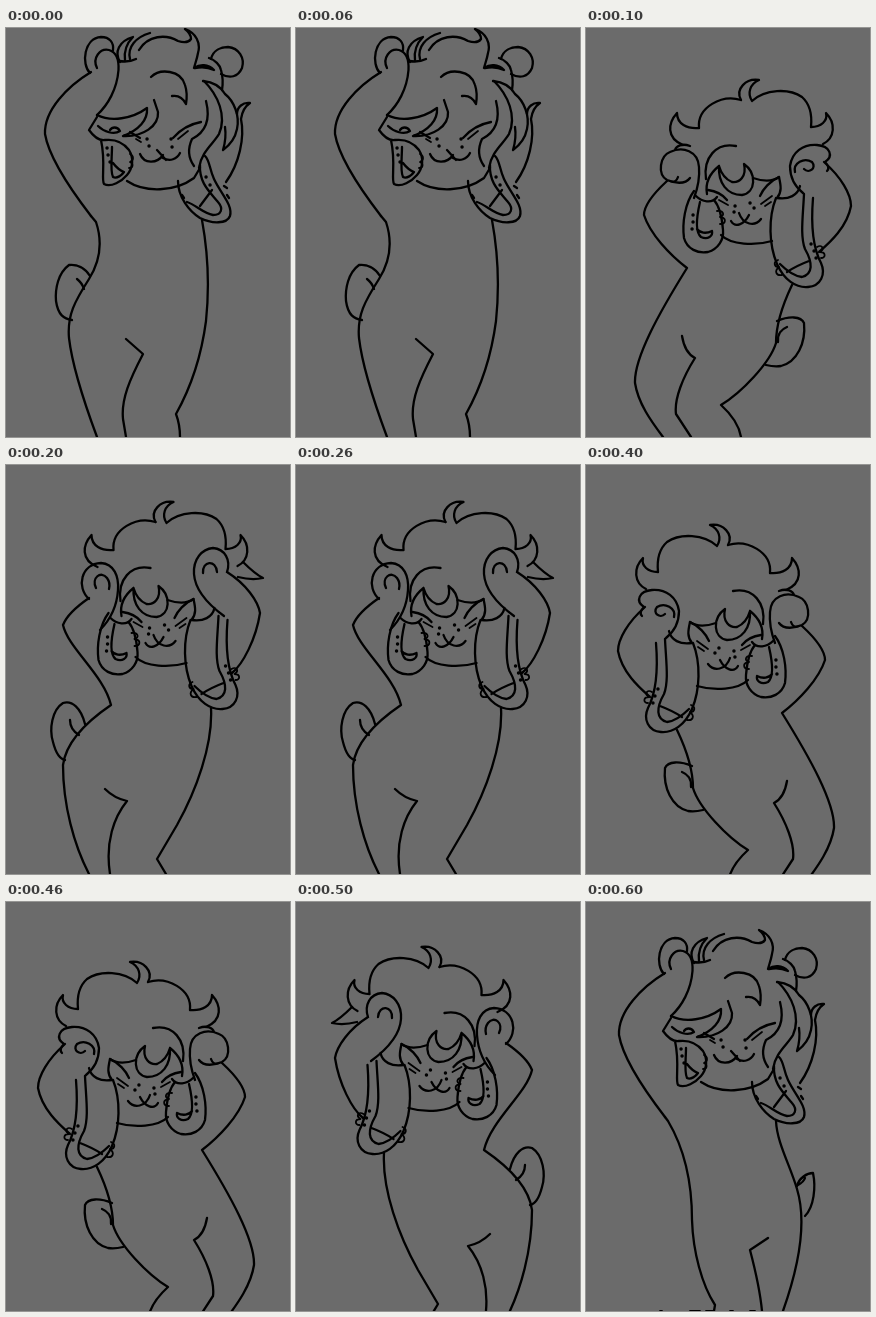
An HTML page without scripts that plays this animation: 284x409 px, repeating every 700 ms.

```html
<!DOCTYPE html>
<html lang="en">
<head>
<meta charset="utf-8">
<title>Dance loop</title>
<style>
html, body { margin: 0; width: 100%; height: 100%; overflow: hidden; background: #6b6b6b; }
svg { display: block; width: 100%; height: 100%; }
.ink { fill: none; stroke: #000; stroke-width: 2.3; stroke-linecap: round; stroke-linejoin: round; }
.fine { stroke-width: 1.8; }
.dots { stroke-width: 3.4; }
.pose { visibility: hidden; animation: show 700ms step-end infinite; animation-delay: calc(var(--i) * 100ms - 700ms); }
@keyframes show {
  0% { visibility: visible; }
  14.2857%, 100% { visibility: hidden; }
}
</style>
</head>
<body>
<svg viewBox="0 0 284 409" preserveAspectRatio="none">
<defs>
  <!-- head tilted back, arms up -->
  <g id="headUp">
    <!-- left paw and arm -->
    <path d="M84 45C75 36 78 10 95 9C104 9 108 15 107 22"/>
    <path d="M91 40C86 30 94 20 103 22C110 24 113 32 112.500 42C111 61 102 77 91 87"/>
    <path d="M85 44C62 58 38 82 39 106C43 130 65 162 85 188"/>
    <!-- crown -->
    <path d="M114 34C108 24 113 13 127 9C120 16 118 24 119 32"/>
    <path d="M124 31C121 19 130 9 144 5"/>
    <path d="M113 33C119 34 126 33 130 31"/>
    <path d="M133 22C142 7 160 6 172 13C178 15 183 14 185 11C185 7 183 4 179 1C190 5 195 15 192 25C191 31 189 36 188 40C194 36 202 36 208 42C202 39 194 39 189 40"/>
    <!-- right paw -->
    <path d="M205 31C207 22 215 19 222 19C233 20 239 30 236 40C232 49 224 51 215 46"/>
    <path d="M203 30C209 32 214 37 215 42C217 49 217 56 216 62"/>
    <!-- side hair -->
    <path d="M197 53C207 54 215 59 219 66C228 73 234 88 231 101C229 111 224 117 217 122C220 112 220 106 219 99"/>
    <path d="M198 53C212 67 221 88 213 106C208 115 195 124 193 140"/>
    <path d="M200 73C205 93 198 105 186 111C181 122 183 131 188 138"/>
    <path d="M231 86C231 79 237 74 244 75C238 79 236 84 235 91C239 110 233 136 220 154"/>
    <!-- fringe -->
    <path d="M145 49C154 40 175 42 179 57C181 63 181 70 180 76C177 70 172 67 166 68"/>
    <path d="M91 87C105 94 126 91 141 80C142 92 133 102 117 108C137 109 153 98 152 84L148 72"/>
    <!-- face -->
    <path d="M167 110C174 102 184 96 195 94M124 104L134 110"/>
    <path class="fine" d="M172 111L182 103M130 111L135 114"/>
    <path d="M134 126C138 136 151 136 157 127M151 122L160 132M157 130C164 134 171 131 174 125"/>
    <path class="dots fine" d="M141 111h.1M143 118h.1M165 111h.1M166 119h.1"/>
    <path d="M121 153C139 165 169 164 188 150L194 140"/>
    <!-- left ear -->
    <path d="M91 89L83 102C88 109 93 113 99 112C108 111 117 114 123 122C128 130 127 140 121 147C116 153 105 160 98 156C95 151 100 135 95 112"/>
    <path d="M92 98C98 104 108 107 114 103C111 98 106 99 104 102"/>
    <path d="M106 119C106 130 104 143 107 149C111 151 116 147 118 144C113 142 110 139 107 135"/>
    <path class="fine" d="M124 126C128 128 128 132 124 134C128 136 127 140 123 140"/>
    <path class="dots" d="M101 120h.1M102 127h.1M104 134h.1"/>
    <!-- right ear -->
    <path d="M172 153C172 169 183 183 194 190C206 196 221 196 224 188C227 177 215 166 208 151C203 140 204 133 199 128"/>
    <path d="M194 137C193 155 204 164 212 174C218 181 215 187 207 187C197 185 190 177 181 174M206 162L194 178"/>
    <path d="M218 158l3 2M221 167l2 3M176 167l2 3"/>
    <path class="dots" d="M200 149h.1M204 157h.1"/>
  </g>

  <!-- head bowed, ears hanging -->
  <g id="headDown">
    <path d="M155 72C136 66 111 79 113 100C101 101 91 96 91 85C82 95 80 110 97 117"/>
    <path d="M155 72C149 61 160 50 173 52C164 56 161 65 166 73C179 61 203 60 216 69C225 77 226 89 225 99C235 99 242 93 240 85C250 95 249 110 237 116"/>
    <!-- fringe -->
    <path d="M120 151C117 130 130 114 150 118"/>
    <path d="M133 138C132 155 141 167 156 167C170 165 171 145 158 136C161 149 153 155 146 154C139 151 135 145 133 138C123 146 119 155 121 166"/>
    <path d="M167 150C176 153 186 154 193 149C195 158 196 164 191 170C203 172 212 167 214 158"/>
    <path d="M193 149C184 153 177 161 174 168M110 168C116 174 126 176 131 169"/>
    <!-- face -->
    <path d="M122 162C130 163 137 167 141 172"/>
    <path class="fine" d="M133 172L142 177M175 176L186 168M179 178L185 174"/>
    <path d="M145 193C149 200 158 197 163 187M153 185C157 197 169 199 175 191"/>
    <path class="dots fine" d="M149 178h.1M148 184h.1M168 180h.1M164 175h.1"/>
    <path d="M135 207C145 217 169 218 186 213"/>
    <!-- left ear -->
    <path d="M108 163C99 175 96 195 98 210C101 221 112 226 122 224C132 221 138 212 137 202C136 189 134 179 128 172"/>
    <path d="M114 174C111 187 109 204 115 209C122 212 127 208 126 203C120 206 114 205 111 201"/>
    <path class="fine" d="M131 183C138 182 139 188 134 189C141 190 140 196 134 196"/>
    <path class="dots" d="M107 187h.1M107 194h.1M106 201h.1"/>
    <!-- right ear -->
    <path d="M190 170C182 190 183 217 191 236C198 252 210 260 222 259C235 258 240 246 235 235C227 220 225 195 227 170"/>
    <path d="M218 166C217 188 214 208 219 221C227 235 227 246 216 249C207 248 200 242 194 236M223 233C215 236 207 240 201 244"/>
    <path class="fine" d="M192 232C187 234 188 239 193 239C188 243 190 248 196 247M231 219C236 216 239 221 234 224C240 224 240 230 235 230"/>
    <path class="dots" d="M225 216h.1M228 223h.1M230 230h.1"/>
  </g>

  <g id="stretch">
    <use href="#headUp"/>
    <path d="M85 188L90 194C97 215 93 235 83 251C69 273 61 287 63 310C66 336 78 374 91 409"/>
    <path d="M84 248C79 240 71 236 63 237C52 245 49 261 50 273C52 287 58 291 66 292M71 251C75 254 77 258 78 261"/>
    <path d="M120 311L137 326C124 351 115 371 117 391L120 409"/>
    <path d="M196 192C203 230 203 264 200 293C195 331 184 361 170 386C173 394 174 402 174 409"/>
  </g>

  <g id="sway">
    <use href="#headDown"/>
    <!-- paws -->
    <path d="M104 118C96 115 90 118 89 122M104 150C99 157 88 155 81 152C71 146 74 128 84 124C97 118 112 123 113 139C114 151 111 162 108 170"/>
    <path d="M84 153C89 155 91 152 92 149"/>
    <path d="M217 165C207 157 204 148 204 138C206 124 217 116 231 117C244 118 248 128 239 134C243 138 243 141 241 143"/>
    <path d="M209 144C207 135 218 129 226 134C231 140 223 146 218 141"/>
    <!-- body -->
    <path d="M81 153C68 165 58 178 58 187C64 206 84 227 101 240C73 285 48 330 49 355C52 375 65 393 77 409"/>
    <path d="M238 134C255 149 265 166 265 178C261 200 242 216 233 224"/>
    <path d="M206 257C195 280 190 297 190 315C184 335 155 365 135 377C145 386 153 397 155 409"/>
    <path d="M191 293C203 288 215 288 218 295C220 315 211 334 195 338C189 339 184 338 180 337M192 314C191 306 196 301 201 299"/>
    <path d="M96 308C98 320 103 327 109 330C97 349 88 371 90 386L105 409"/>
  </g>

  <g id="hip">
    <use href="#headDown" x="-5.500" y="-15"/>
    <!-- paws -->
    <path d="M83 134C70 122 75 99 95 98C108 99 113 111 112 125C111 140 105 154 94 165"/>
    <path d="M90 123C85 113 95 105 101 113C104 117 104 120 103 124"/>
    <path d="M218 151C203 140 189 125 188 109C187 94 196 84 207 83C219 84 225 95 221 107"/>
    <path d="M197 108C196 96 210 94 211 107"/>
    <path d="M237 97C245 105 251 110 257 113C248 115 240 114 232 112"/>
    <!-- body -->
    <path d="M83 133C70 142 60 152 57 160C62 183 98 210 105 240C80 257 60 277 57 300C57 340 68 380 83 409"/>
    <path d="M221 107C240 119 252 136 254 148C250 174 237 199 226 208"/>
    <path d="M205 243C207 280 190 326 171 360L151 394L160 409"/>
    <path d="M79 259C75 243 66 235 57 238C46 245 43 264 47 277C50 289 54 294 59 295M64 255C64 262 68 267 73 270"/>
    <path d="M99 324C105 330 112 334 121 336C108 352 99 377 104 409"/>
  </g>

  <g id="lean">
    <use href="#headUp" x="-6" y="27"/>
    <path d="M79 215L82 219C98 246 106 279 106 318C107 350 116 383 129 403L128 409"/>
    <path d="M190 219C191 241 204 263 211 287C221 320 214 361 197 409"/>
    <path d="M211 284C213 276 221 271 227 271C230 285 228 305 219 314M212 283C216 281 218 279 219 276"/>
    <path d="M182 336L164 348C169 367 174 388 176 409"/>
    <path class="fine" d="M74 409h2M104 409h10M120 409h8M144 409h3M164 409h5"/>
  </g>
</defs>

<g class="ink">
  <g class="pose" style="--i:0"><use href="#stretch"/></g>
  <g class="pose" style="--i:1"><use href="#sway"/></g>
  <g class="pose" style="--i:2"><use href="#hip"/></g>
  <g class="pose" style="--i:3"><use href="#stretch" x="8" y="9"/></g>
  <g class="pose" style="--i:4"><use href="#sway" transform="translate(297 8) scale(-1 1)"/></g>
  <g class="pose" style="--i:5"><use href="#hip" transform="translate(293 8) scale(-1 1)"/></g>
  <g class="pose" style="--i:6"><use href="#lean"/></g>
</g>
</svg>
</body>
</html>
```
